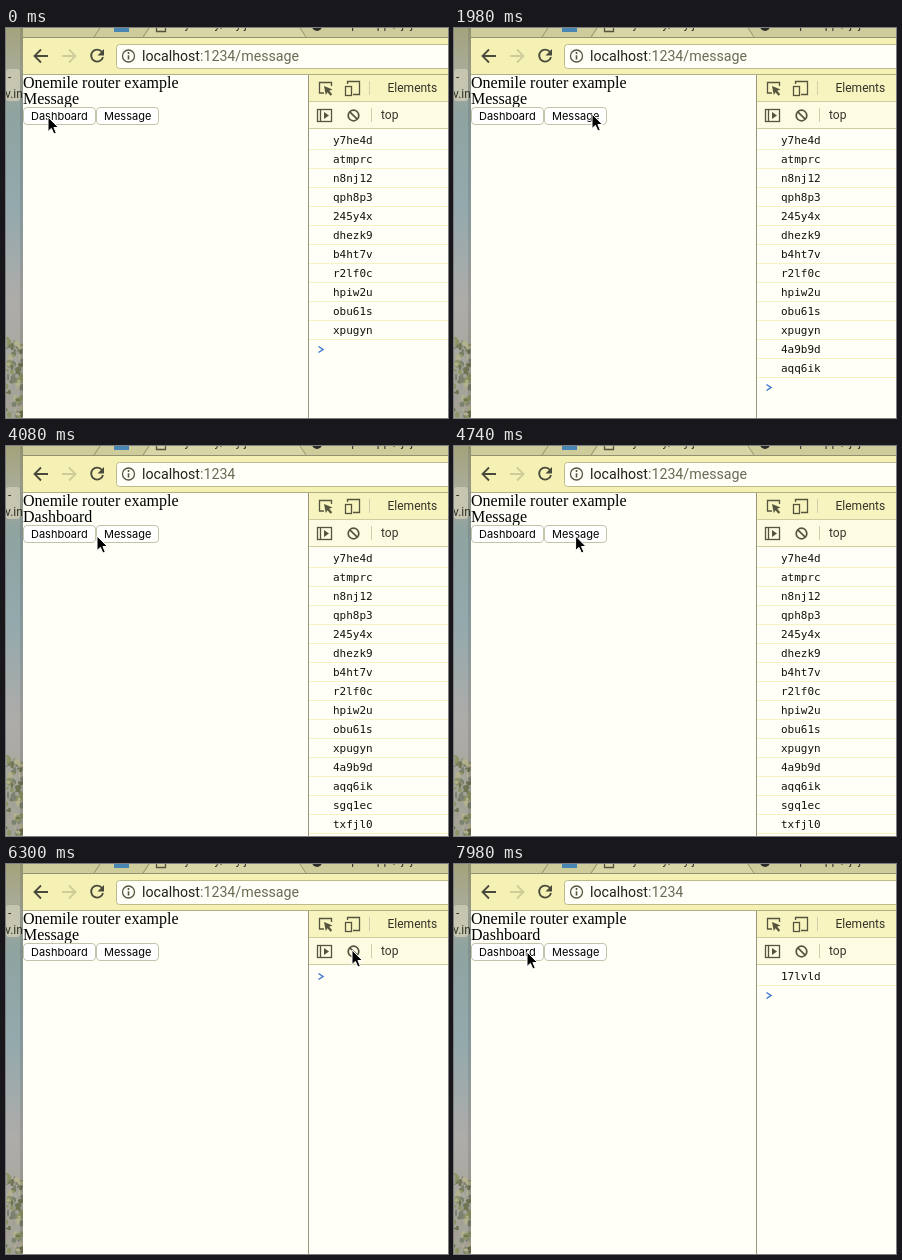
Write an HTML page that moves like this. It is 442 px wide and 390 px high and loops after 8000 ms.

```html
<!DOCTYPE html>
<html lang="en">
<head>
<meta charset="utf-8">
<title>Router example</title>
<style>
  html, body { margin: 0; width: 100%; height: 100%; overflow: hidden; }
  svg { display: block; width: 442px; height: 390px; }
  text { white-space: pre; }
  .page { font: 16px "Liberation Serif", serif; }
  .button { font: 11px Inter, sans-serif; }
  .ui { font: 12px Roboto, sans-serif; fill: #33332a; }
  .url { font: 14.2px Roboto, sans-serif; fill: #22221c; }
  .log { font: 11px "DejaVu Sans Mono", monospace; fill: #11110c; }
  .icon { fill: none; stroke: #55553f; stroke-width: 1.3; }
  .nav { fill: none; stroke: #4a4a3c; stroke-width: 1.8; }
</style>
</head>
<body>
<svg viewBox="0 0 442 390">
  <defs>
    <linearGradient id="desk" x2="0" y2="1">
      <stop offset="0" stop-color="#a3a37c"/>
      <stop offset=".1" stop-color="#a9ab97"/>
      <stop offset=".22" stop-color="#8fa3a0"/>
      <stop offset=".45" stop-color="#93a9ad"/>
      <stop offset=".7" stop-color="#adaca9"/>
      <stop offset="1" stop-color="#a3a294"/>
    </linearGradient>
  </defs>

  <!-- Desktop -->
  <rect width="17" height="390" fill="url(#desk)"/>
  <rect y="41" width="14" height="32" rx="3" fill="#c6c5b0"/>
  <g class="ui"><text x="2" y="53">-</text><text x="-1" y="70">v.in</text></g>
  <g id="leaves"></g>
  <rect x="14" width="3" height="390" opacity=".1"/>

  <!-- Browser window -->
  <rect x="17" width="425" height="390" fill="#fffff8"/>
  <rect x="17" width="425" height="10" fill="#cfcc9c"/>
  <path d="M138 9.5L144 0H295l6 9.5z" fill="#d8d5a6"/>
  <path d="M88 9l6-9M137 9l6-9M294 0l6 9M17 9.5H442" fill="none" stroke="#929070"/>
  <rect x="108" width="15" height="4" fill="#4a86b4"/>
  <path d="M150.500 0v3.500h9V0" class="icon"/>
  <circle cx="311" cy="-2" r="5" fill="#2b2b27"/>
  <g class="ui"><text x="168" y="0">my-story/my.js</text><text x="322" y="0">sample app / jsj</text></g>
  <rect x="17" y="10" width="425" height="36" fill="#f5f1b4"/>
  <path d="M17 46.500H442" stroke="#b0ae82"/>
  <path class="nav" d="M42 28H29M35 21.500L28.500 28l6.500 6.500"/>
  <path class="nav" d="M56 28h13M63 21.500l6.500 6.500-6.500 6.500" stroke-opacity=".22"/>
  <path class="nav" d="M96 24a6 6 0 1 0 1 5"/>
  <path d="M98 21v6.500h-6.500z" fill="#4a4a3c"/>
  <rect x="110.500" y="16.500" width="340" height="24" rx="3" fill="#fffff8" stroke="#bdba8c"/>
  <circle class="icon" cx="122.500" cy="28" r="6"/>
  <path d="M122.500 24v2M122.500 27.300v4.200" stroke="#55553f" stroke-width="1.6"/>
  <text class="url" x="136" y="33">localhost<tspan id="path" fill="#6a6a54"></tspan></text>

  <!-- Page -->
  <g class="page">
    <text x="17" y="60">Onemile router example</text>
    <text id="view" x="17" y="76"></text>
  </g>
  <g fill="#fff" stroke="#c5c4ab">
    <rect x="17.500" y="79.500" width="72" height="17" rx="3.500"/>
    <rect x="90.500" y="79.500" width="62" height="17" rx="3.500"/>
  </g>
  <g class="button"><text x="25" y="92">Dashboard</text><text x="98" y="92">Message</text></g>

  <!-- Developer tools -->
  <rect x="303" y="47" width="139" height="26" fill="#f8f4bf"/>
  <rect x="303" y="74" width="139" height="26" fill="#fdfbe2"/>
  <path d="M303 73.500H442M303 100.500H442" stroke="#cfcca0"/>
  <path d="M302.500 47V390" stroke="#99977a"/>
  <path d="M363.500 53v14M365.500 80v14" stroke="#cfcdaf"/>
  <g class="icon">
    <path d="M318 65h-4.500V54.500h12V58"/>
    <path d="M341.500 56v-2.500h12v13H347"/>
    <rect x="339.500" y="58.500" width="6" height="9"/>
    <rect x="311.500" y="81.500" width="14" height="12"/>
    <path d="M314.500 82v11"/>
    <g stroke-width="1.700">
      <circle cx="347.500" cy="87.500" r="5.300"/>
      <path d="M343.800 83.800l7.400 7.400"/>
    </g>
  </g>
  <path d="M318 58l8.500 3.500-3.300 1.300 3 3.500-1.700 1.500-3-3.600-1.700 2.800zM318 84l5 3.500-5 3.500z" fill="#55553f"/>
  <g class="ui"><text x="381.500" y="64">Elements</text><text x="375" y="91">top</text></g>
  <g id="console" class="log"></g>
  <path id="prompt" d="M312.500-2.500l4.500 3-4.500 3" fill="none" stroke="#3f78d0" stroke-width="1.5"/>

  <path id="cursor" d="M0 0V14.500L3.400 11.400 5.900 17 8.300 16 5.900 10.500H10.400z" fill="#000" stroke="#fff" stroke-width="1"/>
</svg>
<script>
const DURATION = 8000;
const ROW_HEIGHT = 19;
const FIRST_ROW = 112;
const initialKeys = 'y7he4d atmprc n8nj12 qph8p3 245y4x dhezk9 b4ht7v r2lf0c hpiw2u obu61s xpugyn'.split(' ');

const actions = [
  { at: 300, view: 'Dashboard', key: '4a9b9d' },
  { at: 1450, view: 'Message', key: 'aqq6ik' },
  { at: 2800, view: 'Dashboard', key: 'sgq1ec' },
  { at: 3650, view: 'Dashboard', key: 'txfjl0' },
  { at: 4500, view: 'Message', key: 'k3w8zn' },
  { at: 6250, clear: true },
  { at: 7350, view: 'Dashboard', key: '17lvld' }
];

// Pointer stops: time, x, y
const stops = [
  [0, 42, 89], [850, 42, 89], [1250, 125, 88], [1500, 125, 88],
  [1980, 138, 86], [2200, 138, 86], [2700, 76, 90], [3800, 76, 90],
  [4080, 91, 90], [4350, 120, 90], [4900, 122, 90], [5620, 125, 95],
  [5700, 125, 95], [6150, 346, 86], [6350, 346, 86], [6980, 90.5, 92.5],
  [7250, 73, 88], [DURATION, 73, 88]
];

const el = id => document.getElementById(id);
let shownState = -1;

// Plants in the corner of the desktop
function growLeaves() {
  let seed = 7;
  const random = () => (seed = seed * 16807 % 2147483647) / 2147483647;
  const greens = ['#6f7552', '#8e9566', '#b3b18e', '#a39f96', '#7c8270'];
  el('leaves').innerHTML = Array.from({ length: 110 }, (_, i) => {
    const x = random() * 17;
    const y = 310 + x * 0.4 + random() * 78;
    return `<ellipse cx="${x}" cy="${y}" rx="${1 + random() * 2}" ry="${1 + random() * 3}"
      fill="${greens[i % greens.length]}"/>`;
  }).join('');
}

function showState(count) {
  let view = 'Message';
  let keys = initialKeys;
  for (const action of actions.slice(0, count)) {
    if (action.clear) keys = [];
    else {
      view = action.view;
      keys = [...keys, action.key];
    }
  }
  el('view').textContent = view;
  el('path').textContent = view === 'Message' ? ':1234/message' : ':1234';
  el('console').innerHTML = keys.map((key, i) => {
    const y = FIRST_ROW + i * ROW_HEIGHT;
    return `<text x="327" y="${y + 4}">${key}</text>
      <path d="M303 ${y + 9.5}H442" stroke="#f6f3c0"/>`;
  }).join('');
  el('prompt').setAttribute('transform', `translate(0 ${FIRST_ROW + keys.length * ROW_HEIGHT})`);
}

function moveCursor(time) {
  const next = stops.findIndex(stop => stop[0] > time);
  const [t0, x0, y0] = stops[next - 1];
  const [t1, x1, y1] = stops[next];
  const p = (time - t0) / (t1 - t0);
  const eased = p * p * (3 - 2 * p);
  const x = x0 + (x1 - x0) * eased;
  const y = y0 + (y1 - y0) * eased;
  el('cursor').setAttribute('transform', `translate(${x} ${y})`);
}

function draw() {
  const time = performance.now() % DURATION;
  const state = actions.filter(action => action.at <= time).length;
  if (state !== shownState) showState(shownState = state);
  moveCursor(time);
  requestAnimationFrame(draw);
}
growLeaves();
draw();
</script>
</body>
</html>
```
